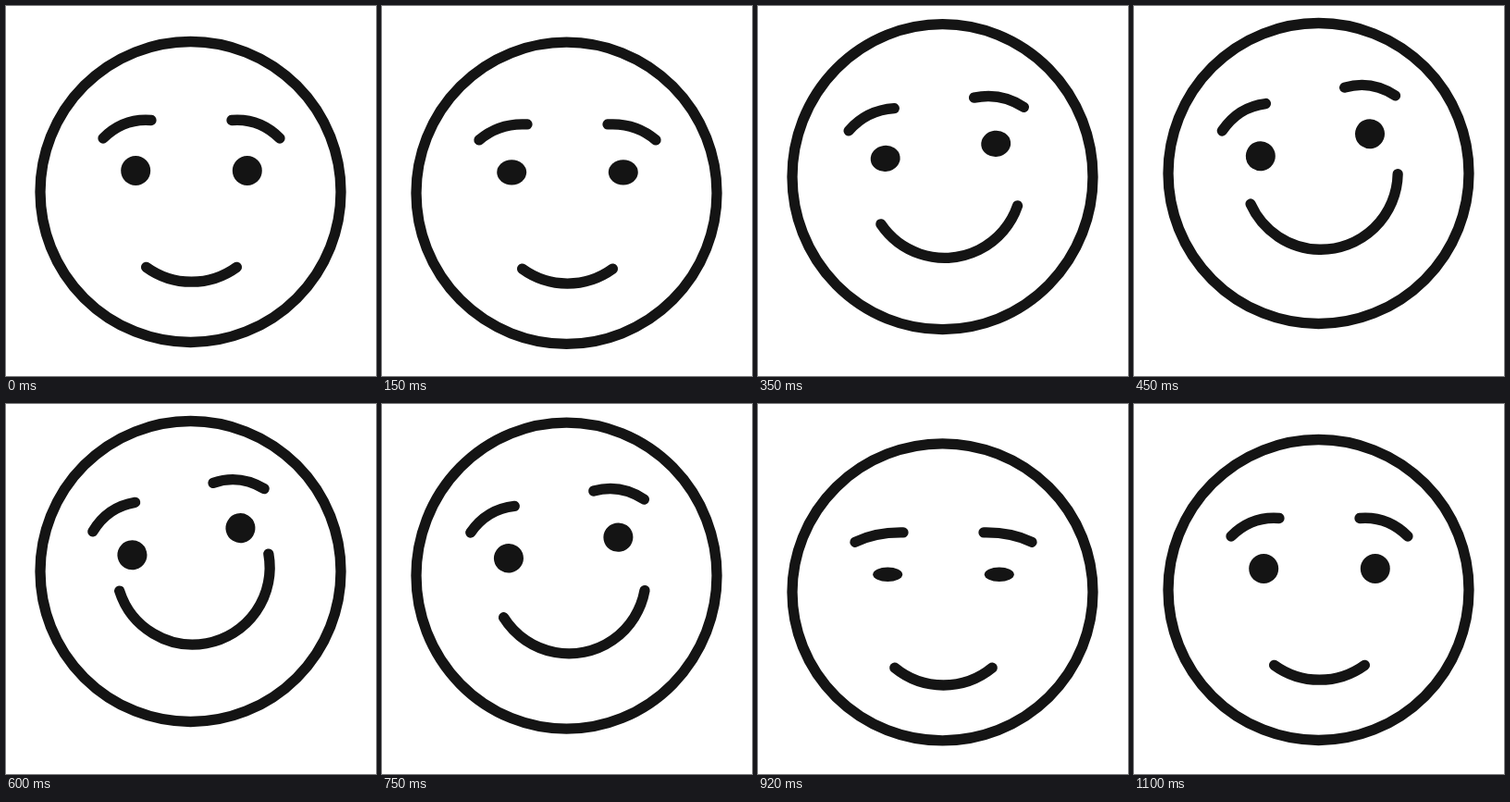
An HTML page with a canvas for the animation above (1.62 s loop, 400 by 400 pixels).

```html
<!DOCTYPE html>
<html lang="en">
<head>
<meta charset="utf-8">
<title>Smiling face</title>
<style>
  html, body { margin: 0; width: 100%; height: 100%; overflow: hidden; background: #fff; }
  canvas { display: block; width: 400px; height: 400px; }
</style>
</head>
<body>
<canvas id="stage" width="400" height="400"></canvas>
<script>
const ctx = document.getElementById('stage').getContext('2d');
const LOOP = 1620, RAD = Math.PI / 180, TURN = Math.PI * 2;

const smooth = x => x * x * (3 - 2 * x);
const slowOut = x => x * (2 - x);
const linear = x => x;

// Eased rise from 0 to 1 between two times.
const ramp = (t, from, to, ease = smooth) =>
  ease(Math.min(1, Math.max(0, (t - from) / (to - from))));

// Rise to 1 at the peak, then fall back to 0.
const pulse = (t, from, peak, to) => ramp(t, from, peak) - ramp(t, peak, to);

function stroke(build) {
  ctx.beginPath();
  build();
  ctx.stroke();
}

function drawEyeAndBrow(side, squat) {
  ctx.beginPath();
  ctx.ellipse(side * 60.3, -23, 16, 16 - 10.5 * squat, 0, 0, TURN);
  ctx.fill();
  stroke(() => {
    ctx.moveTo(side * 95.5, -58);
    ctx.quadraticCurveTo(side * 73.5, -80 + 14 * squat, side * 43.5, -77.5 + 11.5 * squat);
  });
}

function draw(t) {
  const crouch = pulse(t, 120, 220, 400);
  const landing = pulse(t, 740, 850, 1090);
  const squat = crouch + landing;
  const back = ramp(t, 680, 910);
  const hop = ramp(t, 220, 390) - back;
  const tilt = ramp(t, 220, 620, slowOut) - back;
  const smile = ramp(t, 220, 620, slowOut) - ramp(t, 650, 940, linear);

  ctx.fillStyle = '#fff';
  ctx.fillRect(0, 0, 400, 400);
  ctx.fillStyle = ctx.strokeStyle = '#141414';
  ctx.lineWidth = 11.3;
  ctx.lineCap = 'round';

  // The head stretches while it travels and flattens when it lands.
  const headY = 201 - 20 * hop + 5.5 * crouch + 3 * landing;
  const headH = 162.5 + 18 * hop * (1 - hop) + 2.5 * (crouch - landing);
  stroke(() => ctx.ellipse(199.5, headY, 162.5, headH, 0, 0, TURN));

  ctx.save();
  ctx.translate(200.5, 201 - 20 * hop - 10 * tilt + 8 * squat);
  ctx.rotate(-14 * RAD * tilt);
  drawEyeAndBrow(-1, squat);
  drawEyeAndBrow(1, squat);
  const sweep = 36 + 50.4 * smile;
  stroke(() => ctx.arc(0, 14 - 8 * smile, 83.2, (90 - sweep) * RAD, (90 + sweep) * RAD));
  ctx.restore();
}

const start = performance.now();
function tick() {
  draw((performance.now() - start) % LOOP);
  requestAnimationFrame(tick);
}
tick();
</script>
</body>
</html>
```
